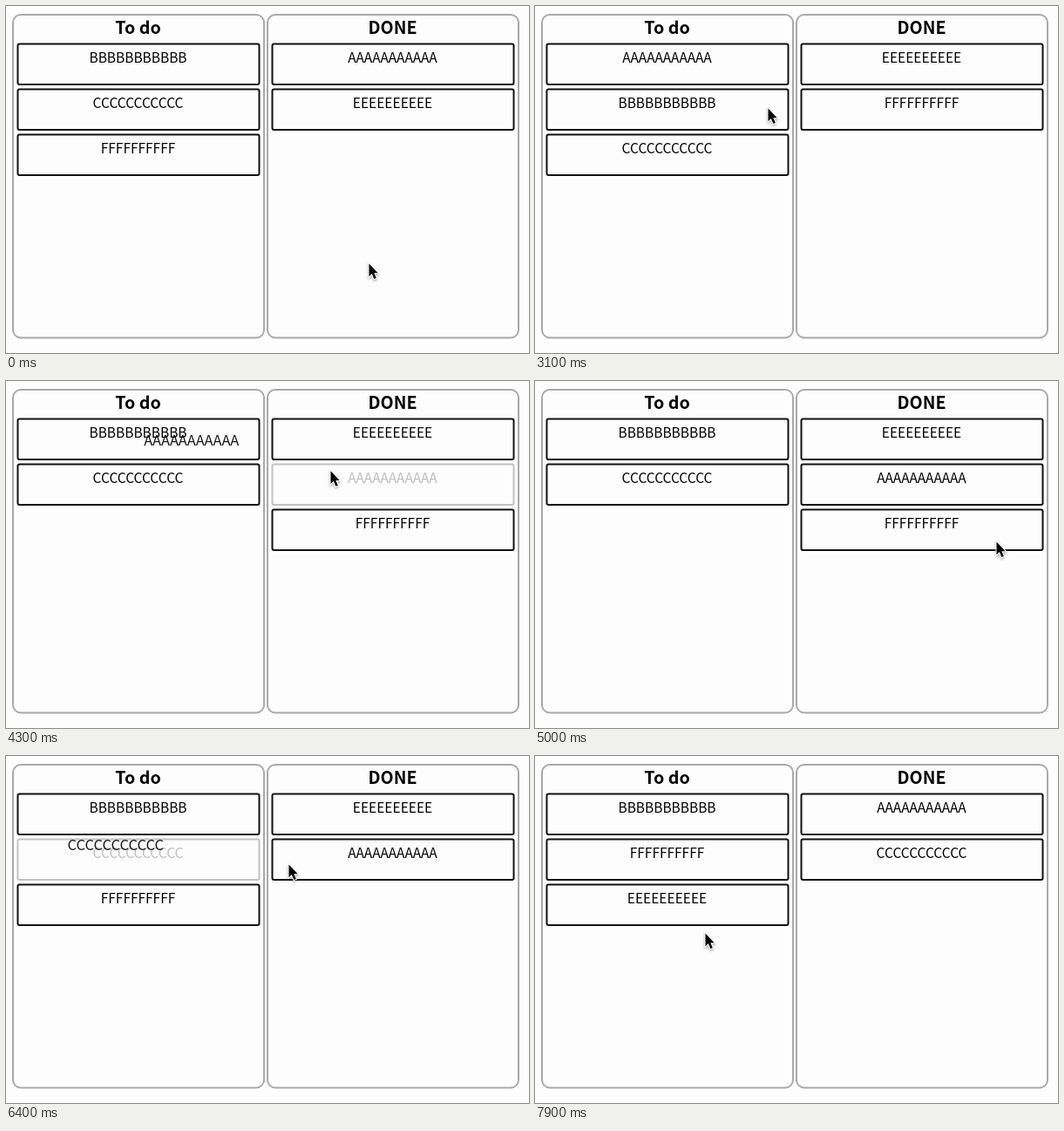
Write an HTML page with a canvas that moves like this. It is 600x398 px and loops after 8 s.

```html
<!DOCTYPE html>
<html lang="en">
<head>
<meta charset="utf-8">
<title>Drag and drop board</title>
<style>
html, body { margin: 0; width: 100%; height: 100%; overflow: hidden; background: #fdfdfd; }
canvas { display: block; }
</style>
</head>
<body>
<canvas id="board" width="600" height="398"></canvas>
<script>
const ctx = document.getElementById('board').getContext('2d');
const LOOP = 8000, STEP = 100, RESET = 2600, LAG = 150, RETURN = 200;
const FONT = '"Noto Sans CJK KR", "Noto Sans CJK JP", "Noto Sans CJK SC", "Noto Sans", sans-serif';
const COLUMNS = [{ title: 'To do', x: 8, mid: 151.5 }, { title: 'DONE', x: 300, mid: 443.5 }];

// each card is grabbed, hops to its new column and slot, then is dropped
const MOVES = [
  { card: 'A', grab: 4050, hop: 4250, drop: 4600, to: 1, slot: 1 },
  { card: 'F', grab: 5150, hop: 5450, drop: 5800, to: 0, slot: 2 },
  { card: 'C', grab: 6050, hop: 6450, drop: 6800, to: 1, slot: 2 },
  { card: 'E', grab: 7050, hop: 7350, drop: 7700, to: 0, slot: 2 }
];

// pointer glides: start, end, x, y; it rests in between
const HOME = [417, 294];
const GLIDES = [
  [0, 300, 482, 345], [300, 700, 124, 365], [700, 1000, 279, 210], [1100, 1500, 308, 364],
  [2550, 3100, 268, 116], [3100, 3900, 184, 74],
  [4000, 4400, 408, 107], [4600, 5000, 530, 183],
  [5100, 5500, 206, 156], [5700, 6000, 288, 132],
  [6000, 6200, 250, 121], [6200, 6600, 400, 125], [6600, 6750, 424, 188],
  [6800, 7000, 470, 75], [7000, 7600, 202, 215], [7700, 7900, 196, 202]
];

const ease = p => p * p * (3 - 2 * p);
const mix = (a, b, k) => a.map((v, i) => v + (b[i] - v) * k);

function pointerAt(t) {
  let pos = HOME;
  for (const [start, end, x, y] of GLIDES) {
    if (t > start) pos = mix(pos, [x, y], ease(Math.min(1, (t - start) / (end - start))));
  }
  return pos;
}

function cardsAt(t) {
  if (t < RESET) return [[...'BCF'], [...'AE']];
  let lists = [[...'ABC'], [...'EF']];
  for (const { card, hop, to, slot } of MOVES) {
    if (t < hop) break;
    lists = lists.map(list => list.filter(c => c !== card));
    lists[to].splice(slot, 0, card);
  }
  return lists;
}

// the drag image trails the pointer and flies back to its old slot after the drop
function ghostAt({ card, grab, drop }, t) {
  const lists = cardsAt(grab);
  const col = lists.findIndex(list => list.includes(card));
  const home = [COLUMNS[col].mid, 59 + lists[col].indexOf(card) * 52];
  const from = pointerAt(grab);
  const now = pointerAt(Math.max(grab, Math.min(t, drop) - LAG));
  const pos = home.map((v, i) => v + now[i] - from[i]);
  return mix(pos, home, Math.max(0, t - drop) / RETURN);
}

function box(x, y, w, h, r, color) {
  ctx.strokeStyle = color;
  ctx.lineWidth = 2;
  ctx.beginPath();
  ctx.roundRect(x, y, w, h, r);
  ctx.stroke();
}

function label(text, x, y, style, color = '#000') {
  ctx.font = style + ' ' + FONT;
  ctx.textAlign = 'center';
  ctx.fillStyle = color;
  ctx.fillText(text, x, y);
}

const cardText = c => c.repeat('ABC'.includes(c) ? 11 : 10);

function drawColumn({ title, x, mid }, cards, dragged) {
  box(x, 10, 288, 370.5, 9, '#a9a9a9');
  label(title, mid, 31.5, 'bold 19.7px');
  cards.forEach((c, i) => {
    ctx.globalAlpha = c === dragged ? 0.25 : 1;
    box(x + 5.5, 43.5 + i * 52, 277, 46.5, 2, '#111');
    label(cardText(c), mid, 65 + i * 52, '15.5px');
  });
  ctx.globalAlpha = 1;
}

function drawPointer([x, y]) {
  const arrow = new Path2D('M0 0V14.7L3.3 11.5L5.8 17.5L8.3 16.4L5.8 10.7H10.2Z');
  ctx.save();
  ctx.translate(x - 0.5, y + 1.5);
  ctx.shadowColor = 'rgba(0,0,0,.35)';
  ctx.shadowBlur = 3;
  ctx.shadowOffsetY = 1.5;
  ctx.strokeStyle = '#fff';
  ctx.lineWidth = 2;
  ctx.stroke(arrow);
  ctx.shadowColor = 'transparent';
  ctx.fillStyle = '#000';
  ctx.fill(arrow);
  ctx.restore();
}

function draw(now) {
  const t = Math.floor(now % LOOP / STEP) * STEP;
  const lists = cardsAt(t);
  const move = MOVES.find(m => t >= m.grab && t < m.drop + RETURN);
  const dragged = move && t < move.drop ? move.card : '';
  ctx.fillStyle = '#fdfdfd';
  ctx.fillRect(0, 0, 600, 398);
  COLUMNS.forEach((column, i) => drawColumn(column, lists[i], dragged));
  if (move) {
    const [x, y] = ghostAt(move, t);
    label(cardText(move.card), x, y + 6, '16.5px', 'rgba(0,0,0,.9)');
  }
  drawPointer(pointerAt(t));
}

const start = performance.now();
function tick() {
  draw(performance.now() - start);
  requestAnimationFrame(tick);
}
tick();
</script>
</body>
</html>
```
